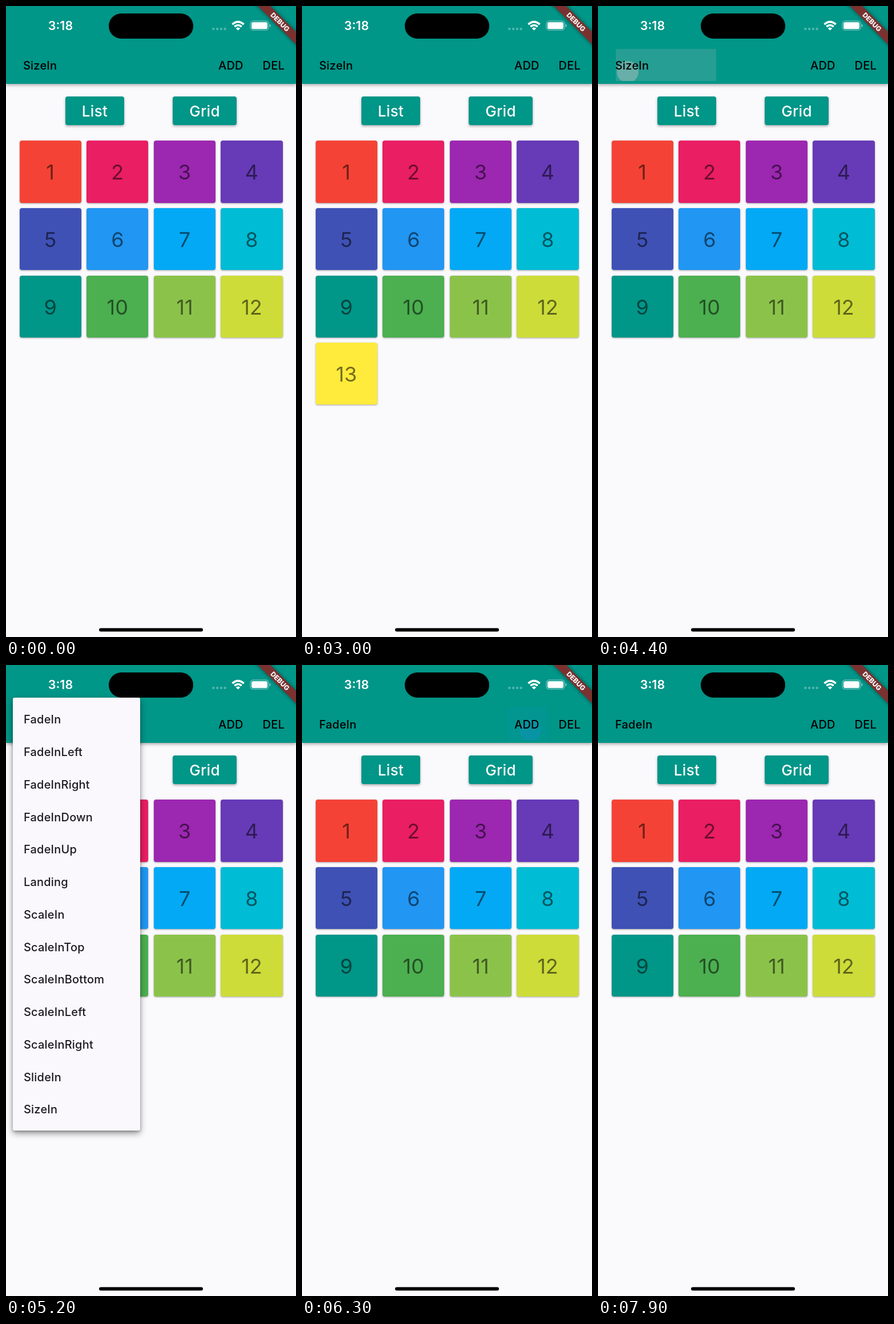
An HTML page for the animation above (8000 ms loop, 508x1102 px).

```html
<!DOCTYPE html>
<html lang="en">
<head>
<meta charset="utf-8">
<title>Animated grid</title>
<style>
  html, body { margin: 0; width: 100%; height: 100%; overflow: hidden; background: #faf9fc; }
  #stage { position: absolute; left: 0; top: 0; width: 508px; height: 1102px; overflow: hidden;
    background: #faf9fc; font: 500 20px/1 Inter, Roboto, sans-serif; }
  #stage div { position: absolute; box-sizing: border-box; }
  #stage svg { position: absolute; left: 0; top: 0; }
  .bar { left: 0; top: 0; width: 508px; height: 136px; background: #009688;
    box-shadow: 0 2px 6px rgba(0,0,0,.36); }
  .text { white-space: pre; letter-spacing: .2px; color: #000; }
  .btn { top: 158px; height: 50px; border-radius: 4px; background: #009688; color: #fff;
    font-size: 26px; line-height: 51px; text-align: center; letter-spacing: .3px;
    box-shadow: 0 2px 4px rgba(0,0,0,.32); }
  .cell { width: 118px; height: 118px; }
  .card { left: 5px; top: 5px; width: 108.4px; height: 108.4px; border-radius: 4px;
    font-size: 36px; font-weight: 400; line-height: 110px; text-align: center;
    color: rgba(0,0,0,.54); box-shadow: 0 1px 3px rgba(0,0,0,.36); }
  .ink { overflow: hidden; }
  .ink > .glow { inset: 0; }
  .ink > .spot { border-radius: 50%; }
  .menu { left: 12px; width: 223px; border-radius: 3px; background: #faf8fc;
    box-shadow: 0 5px 12px rgba(0,0,0,.4), 0 2px 4px rgba(0,0,0,.2); }
  .clip { inset: 0; overflow: hidden; border-radius: 3px; }
  .list { left: 0; width: 223px; height: 756px; }
  .row { left: 19px; color: #1d1b20; }
</style>
</head>
<body>
<div id="stage"></div>
<script>
const LOOP = 8000, TICK = 100;
const COLORS = ['f44336', 'e91e63', '9c27b0', '673ab7', '3f51b5', '2196f3', '03a9f4',
  '00bcd4', '009688', '4caf50', '8bc34a', 'cddc39', 'ffeb3b'];
const EFFECTS = ['FadeIn', 'FadeInLeft', 'FadeInRight', 'FadeInDown', 'FadeInUp', 'Landing',
  'ScaleIn', 'ScaleInTop', 'ScaleInBottom', 'ScaleInLeft', 'ScaleInRight', 'SlideIn', 'SizeIn'];
const MENU = { top: 57, height: 756, row: 56.75, pad: 9.5, open: 4500, close: 5500, time: 300 };
const GREY = ['rgba(188,188,188,.4)', 'rgba(200,200,200,.4)'];
const BLUE = ['rgba(33,150,243,.14)', 'rgba(33,140,243,.2)'];

const stage = document.getElementById('stage');
const clamp = v => Math.max(0, Math.min(1, v));
const ramp = (t, a, b) => clamp((t - a) / (b - a));
const ease = v => v * v * (3 - 2 * v);

function add(parent, cls, style, text = '') {
  const el = document.createElement('div');
  el.className = cls;
  Object.assign(el.style, style);
  el.textContent = text;
  parent.append(el);
  return el;
}

const px = box => Object.fromEntries(Object.entries(box).map(([k, v]) => [k, v + 'px']));

// A touch area: a tint that fades in and a spot that grows from the finger.
function makeInk(parent, box, x, y, [tint, spotColor], downs) {
  const el = add(parent, 'ink', px(box));
  const glow = add(el, 'glow', { background: tint });
  const spot = add(el, 'spot', { background: spotColor });
  const hold = 200;
  return t => {
    const down = downs.filter(d => d <= t).pop();
    const dt = down === undefined ? 0 : t - down;
    const fade = 1 - ramp(dt, hold, hold + 250);
    const r = .19 * dt + .4 * Math.max(0, dt - hold);
    glow.style.opacity = ramp(dt, 0, 200) * fade;
    spot.style.opacity = ramp(dt, 0, 75) * fade;
    Object.assign(spot.style, px({ left: x - box.left - r, top: y - box.top - r, width: 2 * r, height: 2 * r }));
  };
}

// Page
add(stage, 'bar');
const inks = [
  makeInk(stage, { left: 31, top: 75, width: 176, height: 56 }, 52, 115, GREY, [4300]),
  makeInk(stage, { left: 358, top: 72, width: 74, height: 60 }, 400, 114, BLUE, [1200, 6200]),
  makeInk(stage, { left: 435, top: 72, width: 73, height: 60 }, 490, 114, BLUE, [3100, 7200])
];
const label = add(stage, 'text', px({ left: 30, top: 94 }));
add(stage, 'text', px({ left: 372, top: 94 }), 'ADD');
add(stage, 'text', px({ left: 449.5, top: 94 }), 'DEL');
add(stage, 'btn', px({ left: 104, width: 103 }), 'List');
add(stage, 'btn', px({ left: 292, width: 112 }), 'Grid');

const cells = COLORS.map((color, i) => {
  const cell = add(stage, 'cell', px({
    left: 18.5 + 117.6 * (i % 4),
    top: 230.3 + 117.6 * Math.floor(i / 4)
  }));
  add(cell, 'card', { background: '#' + color }, i + 1);
  return cell;
});
const last = cells[12];

// Drop-down list
const menu = add(stage, 'menu');
const list = add(add(menu, 'clip'), 'list');
const rowInk = makeInk(list, { left: 0, top: MENU.pad, width: 223, height: MENU.row }, 70, 40, GREY, [5300]);
const rows = EFFECTS.map((name, i) =>
  add(list, 'text row', px({ top: MENU.pad + MENU.row * (i + .5) - 9.5 }), name));

// Status bar, banner and home bar
stage.insertAdjacentHTML('beforeend', `
<svg width="508" height="1102" viewBox="0 0 508 1102" font-family="Inter, Roboto, sans-serif">
  <text x="95.5" y="42" font-size="21.5" font-weight="600" fill="#fff" text-anchor="middle">3:18</text>
  <rect x="180" y="13" width="148" height="44" rx="22"/>
  <g fill="#fff" fill-opacity=".3">
    <circle cx="363.3" cy="40" r="2.3"/><circle cx="370.1" cy="40" r="2.3"/>
    <circle cx="376.9" cy="40" r="2.3"/><circle cx="383.7" cy="40" r="2.3"/>
  </g>
  <g fill="none" stroke="#fff" stroke-width="3.6">
    <path d="M396.5 32.2Q406.5 23.2 416.5 32.2"/>
    <path d="M400.3 36.2Q406.5 30.8 412.7 36.2"/>
  </g>
  <path d="M402.8 38.9Q406.5 36 410.2 38.9L406.5 42.8Z" fill="#fff"/>
  <rect x="428" y="26.2" width="32" height="16" rx="5" fill="none" stroke="#fff" stroke-opacity=".45" stroke-width="1.3"/>
  <rect x="430" y="28.2" width="28" height="12" rx="3.2" fill="#fff"/>
  <path d="M461.6 31.4q2 .8 2 2.8t-2 2.8z" fill="#fff" fill-opacity=".5"/>
  <g transform="translate(480 28) rotate(45)">
    <rect x="-60" y="-7.75" width="120" height="15.5" fill="#7a3230"
      style="filter:drop-shadow(0 0 3px rgba(0,0,0,.5))"/>
    <text y="4.2" font-size="11.8" font-weight="800" fill="#fff" text-anchor="middle">DEBUG</text>
  </g>
  <rect x="163" y="1086.5" width="182" height="6" rx="3"/>
</svg>`);

function drawMenu(t) {
  const { top, height, row, pad, open, close, time } = MENU;
  const closing = t >= close;
  const v = closing ? 1 - ramp(t, close, close + time) : ramp(t, open, open + time);
  const alpha = closing ? ramp(v, .75, 1) : ramp(v, 0, .25);
  menu.style.visibility = alpha > 0 ? 'visible' : 'hidden';
  menu.style.opacity = alpha;
  // Grows upwards from the chosen row.
  const from = closing ? 0 : (height - row - pad) * (1 - ramp(v, .25, .5));
  Object.assign(menu.style, px({ top: top + from, height: height - from }));
  list.style.top = -from + 'px';
  const unit = .5 / (rows.length + 1.5);
  rows.forEach((el, i) => {
    const start = .5 + (i + 1) * unit;
    el.style.opacity = i === rows.length - 1 ? 1 : ramp(v, start, start + 1.5 * unit);
  });
  rowInk(t);
}

function drawLast(t) {
  const size = ease(ramp(t, 1300, 1750)) * (1 - ease(ramp(t, 3250, 3700)));
  const fade = ramp(t, 6300, 6750) * (1 - ramp(t, 7350, 7800));
  const sizing = t < 4000;
  last.style.opacity = sizing ? +(size > 0) : fade;
  last.style.clipPath = sizing && size < 1 ? `inset(${50 * (1 - size)}% 0)` : 'none';
}

function draw(t) {
  label.textContent = t < MENU.close ? 'SizeIn' : 'FadeIn';
  inks.forEach(ink => ink(t));
  drawLast(t);
  drawMenu(t);
}

const begin = performance.now();
function frame() {
  const t = Math.max(0, performance.now() - begin) % LOOP;
  draw(Math.floor((t + 1) / TICK) * TICK % LOOP);
  requestAnimationFrame(frame);
}
frame();
</script>
</body>
</html>
```
